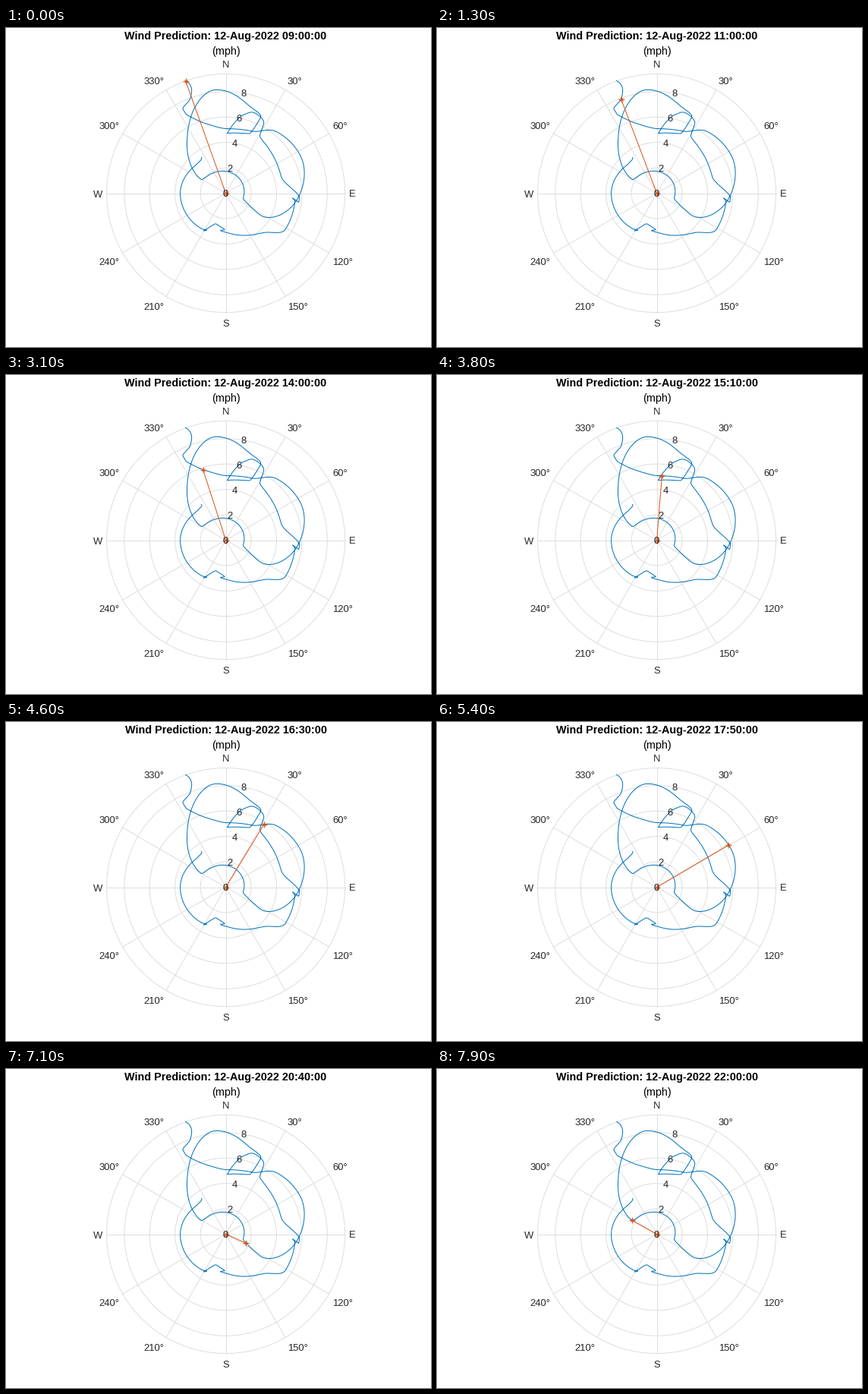
Recreate the animation shown at these times as a matplotlib script. Size 560 by 420 pixels, loop 8 s.

```python
import numpy as np
import matplotlib.pyplot as plt
from matplotlib.animation import FuncAnimation
from matplotlib.patches import Circle

W, H, DPI = 560, 420, 100
FRAMES, INTERVAL = 80, 100
PX = 72 / DPI
CX, CY = 289.6, 217.5
R_OUT, R_LABEL, MPH = 157, 162.5, 16.72
BLUE, ORANGE, GRID, INK = "#0072BD", "#D95319", "#DEDEDE", "#262626"
STEPS = 6  # ten-minute steps in an hour

plt.rcParams["font.family"] = "Liberation Sans"

# Hourly forecast: wind direction (degrees) and speed (mph)
HOURLY = np.array([
    (-19.7, 9.40), (-18.1, 8.74), (-20.8, 7.93), (-27, 7.45), (-26.8, 7.03),
    (-17.9, 5.84), (1, 5.08), (23.2, 5.31), (39.6, 6.28), (64.1, 6.58),
    (96.1, 5.59), (122.3, 3.30), (104.6, 1.42), (-60.8, 2.21), (-36.5, 5.13),
    (-6.3, 8.18), (15.1, 7.12), (24.7, 6.58), (22.1, 5.10), (1.5, 4.72),
    (12.6, 6.31), (19.2, 6.72), (28, 6.37), (31, 5.23), (73.2, 4.56),
    (93, 5.81), (97.1, 5.78), (94.2, 5.28), (97.5, 5.49), (120.7, 5.50),
    (136.1, 4.31), (177.8, 3.11), (188.1, 2.96), (181.8, 2.87), (197.8, 2.54),
    (210.4, 3.43), (207.3, 3.27), (212.3, 3.36), (269, 3.59), (315, 3.23),
    (325.8, 3.40),
])


def polar(deg, r):
    a = np.radians(deg)
    return CX + r * np.sin(a), CY - r * np.cos(a)


def end_slope(a, b):
    s = (3 * a - b) / 2
    return s if s * a > 0 else 0


def monotone(v, t):
    """Shape-preserving cubic through values v at t = 0, 1, 2, ..."""
    d = np.diff(v)
    a, b = d[:-1], d[1:]
    same = a * b > 0
    inner = np.where(same, 2 * a * b / np.where(same, a + b, 1), 0)
    m = np.r_[end_slope(d[0], d[1]), inner, end_slope(d[-1], d[-2])]
    k = np.minimum(np.floor(t).astype(int), len(v) - 2)
    u = t - k
    return (v[k] + d[k] * (3 - 2 * u) * u**2
            + m[k] * u * (1 - u)**2 - m[k + 1] * u**2 * (1 - u))


def wind(hours):
    t = np.asarray(hours, float)
    return polar(monotone(HOURLY[:, 0], t), MPH * monotone(HOURLY[:, 1], t))


fig = plt.figure(figsize=(W / DPI, H / DPI), dpi=DPI, facecolor="white")
ax = fig.add_axes([0, 0, 1, 1])
ax.set_xlim(0, W)
ax.set_ylim(H, 0)
ax.axis("off")


def label(x, y, text, size=13, color=INK, ha="center", **kw):
    return ax.text(x, y + 5, text, fontsize=size * PX, color=color,
                   ha=ha, va="baseline", zorder=6, **kw)


# Grid with speed labels along the 10 degree ray
for speed in range(0, 10, 2):
    ax.add_patch(Circle((CX, CY), speed * MPH, fill=False, ec=GRID, lw=PX))
    x, y = polar(10, speed * MPH)
    label(x, y - 0.5, str(speed))
ax.add_patch(Circle((CX, CY), R_OUT, fill=False, ec=GRID, lw=PX))

# Spokes with compass labels
COMPASS = {0: "N", 90: "E", 180: "S", 270: "W"}
for deg in range(0, 360, 30):
    x, y = polar(deg, R_OUT)
    ax.plot([CX, x], [CY, y], color=GRID, lw=PX, zorder=1)
    x, y = polar(deg, R_LABEL)
    side, rise = np.sign(np.round([x - CX, y - CY]))
    label(x, y + 7.8 * rise, COMPASS.get(deg, f"{deg}°"),
          ha={-1: "right", 0: "center", 1: "left"}[int(side)])

title = label(CX, 10.5, "", 14.4, "black", weight="bold")
label(CX, 29.5, "(mph)", 14.4, "black")

ax.plot(*wind(np.linspace(0, len(HOURLY) - 1, 1201)),
        color=BLUE, lw=PX, zorder=3)
arm, = ax.plot([], [], color=ORANGE, lw=PX, zorder=4)
stars = [ax.plot([], [], ls="", marker=mk, ms=size * PX, mew=PX,
                 color=ORANGE, zorder=5)[0] for mk, size in (("+", 8), ("x", 5))]


def draw(i):
    step = i if i < 5 else i - 1  # one step is held for two ticks
    x, y = wind(step / STEPS)
    for line in [arm, *stars]:
        line.set_data([CX, x], [CY, y])
    hour, minute = divmod(9 * 60 + 10 * step, 60)
    title.set_text(f"Wind Prediction: 12-Aug-2022 {hour:02d}:{minute:02d}:00")
    return [arm, *stars, title]


anim = FuncAnimation(fig, draw, frames=FRAMES, interval=INTERVAL,
                     init_func=lambda: draw(0), repeat=True, repeat_delay=0)
plt.show()
```
